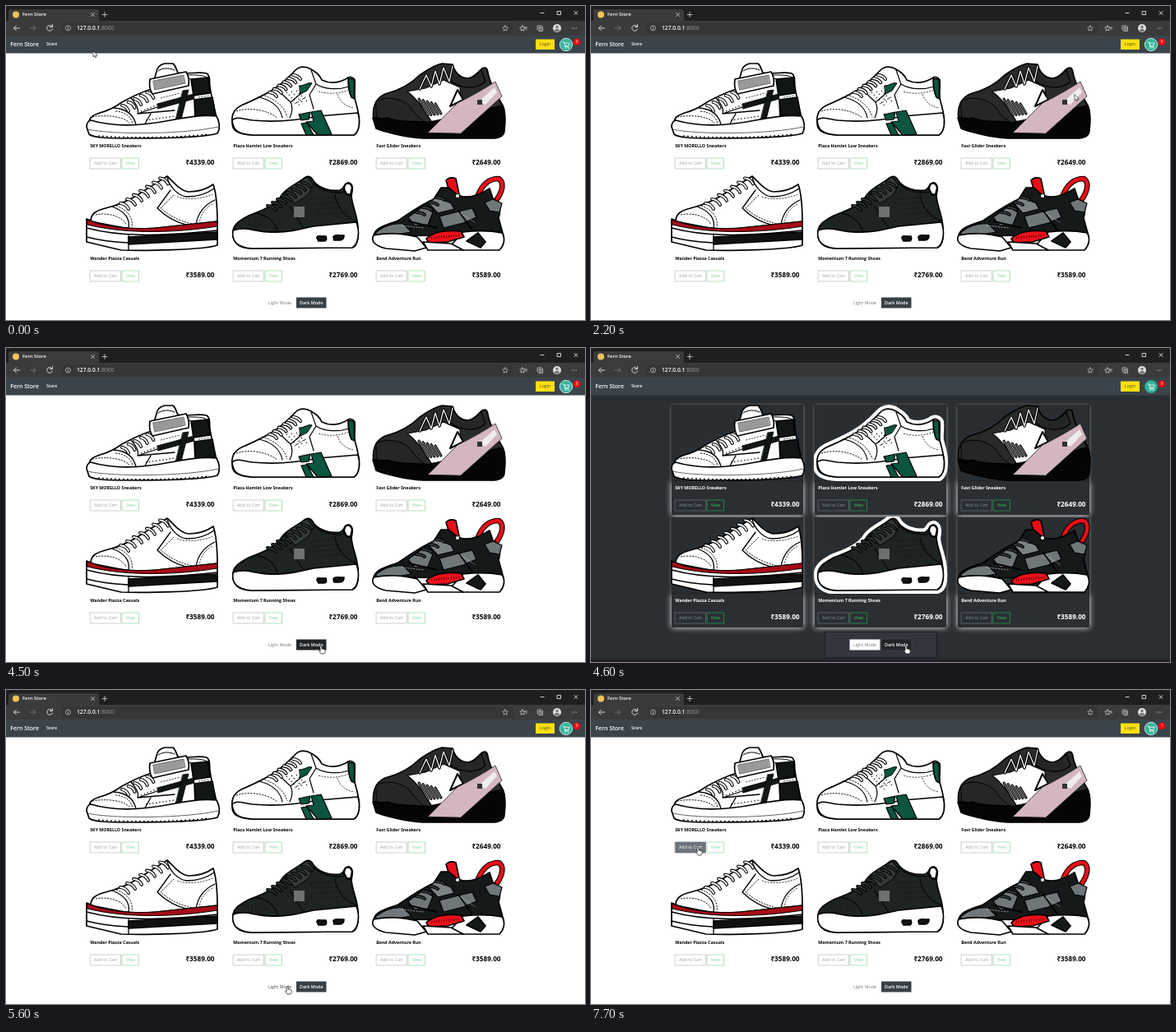
Animation of 704 by 382 pixels, one loop 8000 ms. Source, as an HTML page with a canvas:

```html
<!DOCTYPE html>
<html lang="en">
<head>
<meta charset="utf-8">
<title>Fern Store</title>
<style>
html, body { margin: 0; width: 100%; height: 100%; overflow: hidden; background: #fff; }
canvas { display: block; width: 100%; height: 100%; }
</style>
</head>
<body>
<canvas id="stage"></canvas>
<script>
const W = 704, H = 382, LOOP = 8000, STEP = 100;
const canvas = document.getElementById('stage');
const ctx = canvas.getContext('2d');
const FONT = '"Open Sans", "Noto Sans", sans-serif';

// Pointer path: time, x, y
const PATH = [
  [0, 106, 55], [1200, 106, 55], [2000, 588, 106], [2200, 588, 108], [2900, 404, 149],
  [3000, 404, 149], [3800, 120, 326], [3900, 120, 326], [4500, 382, 362], [4700, 382, 362],
  [5500, 343, 361], [5600, 341, 360], [6500, 129, 191], [LOOP, 129, 191]
];
const DARK_ON = 4600, DARK_OFF = 5600, ADDED = 6600;

let dark = false, pointer = [0, 0], overButton = false;

function path(d, fill, stroke = '#000', lw = 1.7) {
  const p = new Path2D(d);
  if (fill) { ctx.fillStyle = fill; ctx.fill(p); }
  if (stroke) { ctx.strokeStyle = stroke; ctx.lineWidth = lw; ctx.stroke(p); }
}
const line = (d, color = '#000', lw = 1) => path(d, null, color, lw);
function dash(d, color = '#000', lw = 0.9, pattern = [2.2, 1.3]) {
  ctx.save();
  ctx.lineCap = 'butt';
  ctx.setLineDash(pattern);
  line(d, color, lw);
  ctx.restore();
}
function tube(d, inner = '#fff', w = 1.8) {
  line(d, '#000', w + 2.2);
  line(d, inner, w);
}
function laces(x, y, dx, dy, n, lx, ly, inner) {
  for (let i = 0; i < n; i++) {
    const a = x + i * dx, b = y + i * dy;
    tube(`M${a} ${b}q${lx * 0.7} ${ly * 0.1} ${lx} ${ly}`, inner);
  }
}
function rect(x, y, w, h, fill, stroke, lw = 0.7) {
  if (fill) { ctx.fillStyle = fill; ctx.fillRect(x, y, w, h); }
  if (stroke) { ctx.strokeStyle = stroke; ctx.lineWidth = lw; ctx.strokeRect(x, y, w, h); }
}
function disc(x, y, r, fill, stroke, lw = 1) {
  ctx.beginPath();
  ctx.arc(x, y, r, 0, 7);
  if (fill) { ctx.fillStyle = fill; ctx.fill(); }
  if (stroke) { ctx.strokeStyle = stroke; ctx.lineWidth = lw; ctx.stroke(); }
}
function text(s, x, y, size, color, weight = 400, align = 'left') {
  ctx.font = `${weight} ${size}px ${FONT}`;
  ctx.fillStyle = color;
  ctx.textAlign = align;
  ctx.textBaseline = 'middle';
  ctx.fillText(s, x, y);
}

function highTop() {
  path('M101 142C101 136 105 133 114 130C126 127 134 122 141 117C152 111 164 105 177 101L183 80C184 74 188 71 193 70L203 70C207 73 207 78 209 81C220 84 233 79 244 82C249 85 247 92 248 99C250 111 253 124 256 136C210 145 150 150 101 142Z', '#fff');
  path('M225 89L246 87L248 106L228 109Z', '#121516');
  path('M229 114L251 111L255 134L230 137Z', '#121516');
  path('M184 119L228 107L229 113L185 125Z', '#121516', '#000', 0.8);
  path('M215 103L222 102L213 138L206 140Z', '#121516', '#000', 0.8);
  line('M208 82L225 89M214 84C226 84 238 83 245 87M185 79C191 75 198 75 205 78');
  line('M131 124C146 125 155 132 158 144M152 112C159 120 162 126 160 131L184 123M160 131L205 127M168 145L176 131', '#000', 1.3);
  dash('M105 135C122 132 142 134 150 142');
  dash('M133 128C146 129 152 135 154 143');
  dash('M170 139L205 134M164 128L182 121', '#000', 1.3, [1.3, 2.8]);
  dash('M188 112L212 106M234 111L248 109', '#000', 0.7);
  laces(141, 121, 7.6, -4, 5, 8, 7);
  path('M175 89L219 80C222 85 223 91 222 97L178 107C175 102 174 95 175 89Z', '#fff');
  path('M179 91L216 84L218 94L181 102Z', '#b0b0b0', '#333', 0.6);
  for (let i = 0; i < 18; i++) line(`M${180 + i * 2} ${91.5 - i * 0.38}l1.3 9.5`, '#555', 0.5);
  path('M98 147C98 142 100 140 103 139C130 147 165 146 200 139C220 135 240 132 256 134C260 142 260 150 257 155C240 160 190 161 150 161C120 161 106 160 101 156Z', '#fff');
  line('M99 150C130 157 220 156 258 147', '#222', 0.7);
  dash('M112 158C150 161 210 160 246 156', '#000', 1.3, [2, 3]);
}

const COURT = 'M275 142C274 132 277 126 286 121C300 115 318 107 330 98C341 90 346 84 352 78C357 73 365 73 371 77C376 80 381 83 384 90C394 95 405 93 413 89C417 85 422 86 424 90C425 98 423 105 424 112C426 121 429 128 429 137C429 148 428 153 423 157L300 157C282 156 275 152 275 142Z';
function court() {
  path(COURT, '#fff');
  path('M416 88L423 89C424 98 423 106 424 113L420 111C417 105 416 97 416 88Z', '#0c5540');
  path('M357 97C363 97 368 92 372 94L366 103L358 107Z', '#0c5540', '#000', 1);
  line('M371 78L377 95C388 102 405 102 417 98M377 95L369 108L374 125M306 111C320 113 333 121 336 136M328 100L346 117L358 107M346 117C349 123 348 130 345 136', '#000', 1.2);
  dash('M280 128C295 123 317 126 330 136M311 108C325 112 338 121 342 135');
  dash('M380 104C393 108 408 106 417 102M403 107C406 116 412 122 423 124M351 119L366 110', '#000', 0.7);
  for (let i = 0; i < 3; i++) dash(`M${341 + i * 6} ${105 - i}L${358 + i * 4} ${122 - i * 3}`, '#000', 1.2, [1.2, 3]);
  laces(320, 105, 5.8, -4.2, 6, 9, 5);
  path('M275 139C280 134 286 137 300 139C330 142 355 139 380 134L428 130C431 140 430 153 423 157L300 157C280 156 276 150 275 139Z', '#fff');
  path('M356 132L370 129L368 138L359 139Z', '#0c5540', '#000', 1.2);
  path('M371 129L383 127L396 156L379 157L365 141L374 140Z', '#0c5540', '#000', 1.2);
  path('M359 143L366 142L374 157L365 157Z', '#0c5540', '#000', 1.2);
}

function racer() {
  path('M447 138C445 124 449 112 461 107C477 103 492 95 503 84C512 78 520 72 530 70L543 71C545 80 552 88 562 88C570 87 574 80 579 76C583 74 585 75 586 81C588 94 597 109 604 121C607 128 607 137 604 143L520 151Z', '#292b2a');
  path('M488 104L510 100L532 90L552 99L553 124L536 142L517 140C509 126 500 113 488 104Z', '#fff', '#000', 1.2);
  path('M543 72C547 83 552 88 562 88C570 87 574 82 578 78L583 92C570 103 553 100 540 91Z', '#242726', '#000', 1.2);
  path('M450 116C462 109 480 112 491 122C498 132 504 139 512 142L451 138Z', '#242726', '#000', 1);
  for (let i = 0; i < 5; i++) {
    const x = 502 + i * 5, y = 113 + i * 1.5;
    tube(`M${x} ${y}L${x + 11 - i} ${y + 20 - i * 2}`, '#a9abab', 0.9);
  }
  path('M540 122L549 102L556 114Z', '#fff', '#000', 2);
  path('M446 136C448 134 455 139 463 136C480 143 498 139 512 142L530 138L604 121C608 130 607 143 606 151C606 159 599 161 590 161L507 161C488 160 459 153 450 149Z', '#050505');
  path('M513 154L549 118C566 110 584 99 595 92L603 110L553 155Z', '#d3b6be', '#222', 0.8);
  path('M575 116L594 99L597 105L583 120Z', '#eee', null);
  rect(573, 114, 6, 6, '#333');
  tube('M503 101L511 84L517 98L522 79L527 95L532 75L539 92L543 73', '#fff', 1.2);
}

function platform() {
  path('M103 262C103 253 109 249 121 246C141 241 153 235 166 226L196 207C202 212 211 225 222 226C234 226 245 222 252 217C256 229 257 246 257 264L160 273Z', '#fff');
  line('M196 208C198 218 208 231 220 232C234 232 246 227 253 222M129 244C145 250 151 259 149 270M200 224L184 246C192 254 205 263 222 267M254 236C239 243 233 253 231 266', '#000', 1.3);
  dash('M109 254C122 251 141 255 146 266');
  dash('M134 243C148 248 155 258 153 269M204 230L188 246C198 255 210 261 226 265');
  dash('M251 241C240 247 236 256 235 265M208 232C220 237 240 234 252 229', '#000', 0.7);
  laces(139, 240, 8, -5.1, 7, 10, 7);
  path('M98 259C118 269 157 273 184 270L257 262L257 291C239 297 166 298 140 297L98 287Z', '#fff');
  path('M99 260C121 269 149 272 181 270L257 262L257 268C214 275 150 279 99 266Z', '#a70d17', '#000', 1);
  line('M98 270C135 280 181 281 257 273M98 281C113 285 130 287 148 288', '#000', 1.3);
  path('M149 281L257 275L257 284L149 290Z', '#111');
  line('M149 279L149 297', '#000', 1.3);
}

const RUNNER = 'M276 277C275 266 284 261 295 255C314 248 328 242 336 229C343 220 355 216 363 209C367 206 371 207 374 213C380 221 394 226 406 224C412 222 411 215 417 215C423 218 421 226 420 231C421 245 428 255 428 271C429 285 427 292 421 294L299 295C282 294 276 288 276 277Z';
function runner() {
  path(RUNNER, '#1d2423');
  path('M411 223C411 214 419 213 421 221L419 230L414 229Z', '#fff', '#000', 2.4);
  path('M339 227C347 218 358 214 366 208L374 218L367 230L352 240Z', '#333a3a', '#000', 1);
  line('M374 215C382 225 397 229 413 226M303 252C319 254 328 264 331 276M345 244L361 269M400 230C402 245 413 257 425 261', '#060808', 1.3);
  for (let i = 0; i < 4; i++) {
    dash(`M${371 + i * 3} ${235 + i * 6}L${401 + i * 5} ${233 + i * 6}`, '#050707', 1, [1.2, 3]);
    dash(`M${287 + i * 4} ${262 + i * 2}L${310 + i * 4} ${254 + i * 4}`, '#0a0d0d', 1, [1, 3]);
  }
  rect(350, 244, 13, 13, '#6d7171');
  laces(318, 243, 6, -4, 8, 10, 5, '#2b3231');
  path('M276 273C292 267 306 276 324 275C340 276 357 272 374 268L426 263C431 276 428 290 421 294L299 295C280 294 274 285 276 273Z', '#fff');
  path('M378 282Q378 279 383 280L389 280Q391 286 386 286L380 286Z', '#111');
  path('M398 281Q399 278 406 279L411 279Q411 285 405 285L399 285Z', '#111');
}

function trainer() {
  tube('M574 230C580 215 590 210 599 210C606 214 604 225 597 235', '#e90d17', 4.5);
  path('M535 212Q540 207 547 210L551 229L541 232Z', '#e90d17');
  path('M447 279C449 269 463 266 477 261C490 252 504 242 520 235L529 221L538 221L548 229C558 235 572 232 588 222L592 234C603 240 601 252 599 258L605 280Z', '#15191a');
  path('M449 276C460 267 473 264 483 265L493 275L455 281Z', '#6f777b', '#000', 1.2);
  path('M489 257L507 244L519 251L513 266L497 267Z', '#6f777b', '#000', 1.2);
  path('M514 240L523 232L541 240L545 247L525 252Z', '#7b8386', '#000', 1.2);
  path('M527 256L550 250L567 246L572 257L556 264L532 270Z', '#6f777b', '#000', 1.2);
  path('M582 239L592 235L603 240L600 251L588 249Z', '#6f777b', '#000', 1.2);
  line('M490 262L524 270M550 249L568 274', '#000', 1.8);
  dash('M481 267L508 270M553 252L571 264', '#ddd', 0.6);
  laces(499, 251, 8, -6, 4, 10, 3, '#343a3c');
  disc(549, 231, 2, '#fff');
  path('M447 279C466 275 482 277 500 281L511 294L497 298L462 295C449 292 443 286 447 279Z', '#fff');
  path('M556 275C572 273 588 273 603 276C608 283 605 292 600 297L556 297L541 291Z', '#fff');
  path('M511 283C519 275 535 272 553 274L557 281L537 287L514 288Z', '#ea111b');
  dash('M517 282L551 279', '#730006', 3, [1, 2]);
  path('M507 287L541 289L556 297L513 297Z', '#fff');
  path('M560 286L574 276L583 287L577 294Z', '#15191a');
}

const PRODUCTS = [
  ['SKY MORELLO Sneakers', '4339', highTop],
  ['Plaza Hamlet Low Sneakers', '2869', court, COURT],
  ['Fast Glider Sneakers', '2649', racer],
  ['Wander Piazza Casuals', '3589', platform],
  ['Momentum 7 Running Shoes', '2769', runner, RUNNER],
  ['Bend Adventure Run', '3589', trainer]
];

function hot(x, y, w, h) {
  const [px, py] = pointer;
  const inside = px >= x && px <= x + w && py >= y && py <= y + h;
  overButton = overButton || inside;
  return inside;
}
function outlineButton(label, x, y, w, ink, edge, solid) {
  const on = hot(x, y, w, 13);
  rect(x, y, w, 13, on ? solid : null, on ? solid : edge);
  text(label, x + w / 2, y + 6.7, 5.3, on ? '#fff' : ink, 400, 'center');
}
function glow(x, y, w, h, blur, alpha) {
  ctx.save();
  ctx.shadowColor = `rgba(255,255,255,${alpha})`;
  ctx.shadowBlur = blur * canvas.width / W;
  rect(x, y, w, h, '#292e33');
  ctx.restore();
}
function product([name, price, shoe, halo], i) {
  const x = 98 + 174 * (i % 3), y = 69 + 137 * Math.floor(i / 3);
  if (dark) {
    glow(x, y + 1, 160, 92, 3, 0.75);
    glow(x, y + 94, 160, 40, 7, 0.95);
    rect(x, y + 0.5, 160, 92.5, '#292e33', '#15181b', 0.6);
  }
  ctx.save();
  ctx.beginPath();
  ctx.rect(x - 1, y - 1, 163, 94.5);
  ctx.clip();
  if (dark && halo) line(halo, '#fff', 10);
  shoe();
  ctx.restore();
  if (dark) rect(x, y + 93, 160, 41, '#2a2f34');
  const ink = dark ? '#fff' : '#050505';
  text(name, x + 4.2, y + 101.3, 5.3, ink, 700);
  outlineButton('Add to Cart', x + 4.5, y + 116, 37, dark ? '#89929a' : '#a0a0a0', dark ? '#69727a' : '#b9b9b9', '#6c757d');
  outlineButton('View', x + 43.5, y + 116, 20, dark ? '#35c957' : '#8bd49b', dark ? '#28a745' : '#93d5a2', '#28a745');
  text(`₹${price}.00`, x + 155.5, y + 121.4, 8.2, ink, 700, 'right');
}

function browser() {
  rect(0, 0, W, 18, '#1f1f1f');
  path('M3 18V7Q3 4 6 4H110Q113 4 113 7V18Z', '#3b3b3b', null);
  disc(12, 10.5, 4, '#edc45a');
  text('Fern Store', 20, 10.7, 5.8, '#fff', 600);
  line('M103.5 8.5l4 4m0 -4l-4 4M117 10.5h6m-3 -3v6', '#ddd', 0.8);
  line('M650 8.5h4M691 6.5l4 4m0 -4l-4 4', '#fff', 0.8);
  rect(670.5, 6.5, 4, 4, null, '#fff', 0.8);
  rect(0, 18, W, 18, '#3b3b3b');
  ctx.fillStyle = '#363636';
  ctx.beginPath();
  ctx.roundRect(68, 20, 549, 14, 3);
  ctx.fill();
  line('M16.5 27h-7m3 -3l-3 3l3 3', '#e8e8e8', 0.9);
  line('M29 27h7m-3 -3l3 3l-3 3', '#777', 0.9);
  line('M56 25A3.4 3.4 0 1 0 56.4 28M56.4 22.5v3h-3', '#e8e8e8', 0.9);
  disc(75.5, 27, 3, null, '#ccc', 0.7);
  line('M75.5 26.7v2M75.5 25.1v.2', '#ccc', 0.7);
  text('127.0.0.1', 86, 27.2, 6.7, '#fff', 600);
  const hostWidth = ctx.measureText('127.0.0.1').width;
  text(':8000', 86 + hostWidth, 27.2, 6.7, '#999');
  const star = 'l1 2.1l2.3 .3l-1.7 1.6l.4 2.3l-2 -1.1l-2 1.1l.4 -2.3l-1.7 -1.6l2.3 -.3z';
  line('M607 23.8' + star, '#ccc', 0.7);
  line('M628 23.8' + star + 'M630.5 26h3m-2 2h2', '#ddd', 0.7);
  rect(646.5, 24, 4.5, 5, null, '#ddd', 0.7);
  line('M648 30.5h4.5v-5M648.8 25.5v2m-1 -1h2', '#ddd', 0.7);
  disc(670, 27, 5, '#dedede');
  disc(670, 25.4, 1.7, '#777');
  path('M666.8 30.3Q667 27.8 670 27.8T673.2 30.3Q670 32.4 666.8 30.3Z', '#777', null);
  for (let i = 0; i < 3; i++) disc(688.7 + i * 2.4, 27, 0.6, '#eee');
}

function navbar(count) {
  rect(0, 36, W, 21.5, '#3b444a');
  text('Fern Store', 5.2, 47, 7, '#fff', 600);
  text('Store', 49, 47, 5.2, '#fff', 600);
  rect(644, 40.5, 23, 12.5, '#ffe011');
  text('Login', 655.5, 47, 5.5, '#55501b', 400, 'center');
  disc(681, 47, 7.7, '#36b39d', dark ? '#2b8e80' : '#d5eee9', 0.9);
  line('M677 44h1.5l1.3 4.4h4.3l1.1 -3.3h-6.2M679.8 48.4l-.6 1.5h5.2', '#fff', 0.8);
  disc(680.2, 51.2, 0.6, '#fff');
  disc(683.6, 51.2, 0.6, '#fff');
  disc(694, 43.7, 4.3, '#f50912');
  text(count, 694, 43.9, 4.8, '#fff', 400, 'center');
}

function modeButton(label, x, w, fill, ink, weight, ring) {
  if (ring) rect(x - 0.5, 354, w + 1, 14, null, ring, 1.2);
  if (fill) rect(x, 354.5, w, 13, fill);
  text(label, x + w / 2, 361.3, 5.4, ink, weight, 'center');
}
function modeSwitch() {
  if (dark) rect(284.5, 345.5, 136, 31, '#31363f', '#1c1f26', 1.2);
  const onLight = hot(314.5, 354.5, 37, 13);
  const onDark = hot(353, 354.5, 36.5, 13);
  const darkFill = onDark ? '#20262a' : dark ? null : '#384047';
  modeButton('Light Mode', 314.5, 37, dark ? '#fff' : null, onLight ? '#444' : '#777', 400, dark && onLight && '#8b8f95');
  modeButton('Dark Mode', 353, 36.5, darkFill, '#fff', 600, dark && onDark && '#42474e');
}

function drawPointer() {
  ctx.save();
  ctx.translate(...pointer);
  if (overButton) {
    path('M0 1Q1 -.5 2 1V4.2Q3 3.3 3.7 4.5Q4.8 3.8 5.3 5Q6.2 4.7 6.2 6.2Q6.3 8.5 5 10H1.2L-1.3 6.6Q-1.5 5.2 0 6Z', '#fff', '#111', 0.7);
  } else {
    path('M0 0V7L1.6 5.5L2.7 8L3.9 7.5L2.8 5.1H5Z', '#fff', '#111', 0.6);
  }
  ctx.restore();
}

function pointerAt(t) {
  const i = PATH.findIndex(k => k[0] > t);
  const [t0, x0, y0] = PATH[i - 1], [t1, x1, y1] = PATH[i];
  const u = (t - t0) / (t1 - t0), e = u * u * (3 - 2 * u);
  return [x0 + (x1 - x0) * e, y0 + (y1 - y0) * e];
}

function draw(t) {
  dark = t >= DARK_ON && t < DARK_OFF;
  pointer = pointerAt(t);
  overButton = false;
  rect(0, 0, W, H, dark ? '#2a2f34' : '#fff');
  browser();
  navbar(t >= ADDED ? '1' : '0');
  PRODUCTS.forEach(product);
  modeSwitch();
  if (dark) rect(0, 378.5, W, 3.5, '#241f28');
  drawPointer();
}

function frame(now) {
  const ratio = devicePixelRatio || 1;
  const w = Math.round(innerWidth * ratio), h = Math.round(innerHeight * ratio);
  if (canvas.width !== w || canvas.height !== h) { canvas.width = w; canvas.height = h; }
  ctx.setTransform(w / W, 0, 0, h / H, 0, 0);
  ctx.lineJoin = ctx.lineCap = 'round';
  draw(Math.floor((now % LOOP) / STEP) * STEP);
  requestAnimationFrame(frame);
}
frame(performance.now());
</script>
</body>
</html>
```
